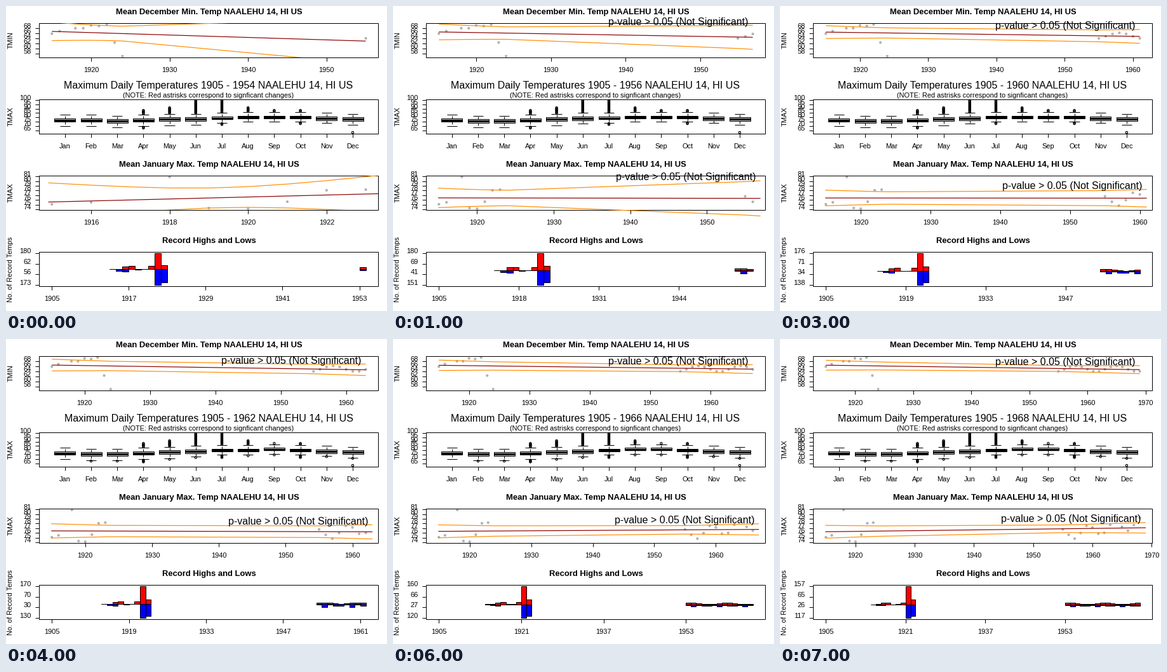
Write a matplotlib script that moves like this. It is 600 px wide and 480 px high and loops after 8 s.

```python
import math
import numpy as np
import matplotlib.pyplot as plt
from matplotlib.animation import FuncAnimation
from matplotlib.patches import Circle, Rectangle

W, H, DPI = 600, 480, 100
PX = 72 / DPI                      # points per pixel
LEFT, RIGHT, BOX_H = 52, 586, 54
X0, SPAN = 72.2, 494.4             # data range inside the 4% padding
TOPS = (27, 147, 267, 387)
STATION = "NAALEHU 14, HI US"
MONTHS = "Jan Feb Mar Apr May Jun Jul Aug Sep Oct Nov Dec".split()
STEPS = 8

plt.rcParams["font.family"] = "Liberation Sans"
fig = plt.figure(figsize=(W / DPI, H / DPI), dpi=DPI, facecolor="white")
ax = fig.add_axes([0, 0, 1, 1])


def text(x, y, s, size=11, **kw):
    kw = {"ha": "center", "va": "baseline", **kw}
    ax.text(x, y, s, fontsize=size * PX, color="black", **kw)


def line(xs, ys, color="black", width=1, **kw):
    kw = {"solid_capstyle": "butt", **kw}
    return ax.plot(xs, ys, color=color, lw=width * PX, **kw)[0]


def rect(x, y, w, h, face="none"):
    patch = Rectangle((x, y), w, h, fc=face, ec="black", lw=PX)
    return ax.add_patch(patch)


def frame(top, ylabel, x_ticks, y_ticks):
    """Panel box with (place, label) pairs for both axes."""
    base = top + BOX_H
    for x, s in x_ticks:
        line([x, x], [base, base + 6])
        text(x, base + 23, s)
    for y, s in y_ticks:
        line([LEFT - 6, LEFT], [y, y])
        text(39.5, y, s, ha="right")
    text(7.5, top + BOX_H / 2, ylabel, rotation=90, va="center")
    return rect(LEFT, top, RIGHT - LEFT, BOX_H)


def wave(year, mid, slope, swing, peak, period):
    return mid + slope * (year - 1955) + swing * np.cos(2 * np.pi * (year - peak) / period)


# Yearly means as heights on the stage; the station was closed 1925-1954
FIRST_YEARS = [1915, 1916, *range(1918, 1925)]
LATER = np.arange(1955, 1970)
DEC_MEAN = dict(zip(FIRST_YEARS, (43.5, 39.5, 35, 35, 30.5, 31.5, 29, 57.5, 79)))
DEC_MEAN.update(zip(LATER, wave(LATER, 46.8, 0, -4.5, 1958, 7)))
JAN_MEAN = dict(zip(FIRST_YEARS, (312, 309, 269, 318, 319, 308, 290, 289)))
JAN_MEAN.update(zip(LATER, wave(LATER, 308, -1.4, 9, 1957, 4.5)))


def fit_band(xs, ys, at):
    """Least squares line and the half width of its 95% confidence band."""
    slope, cut = np.polyfit(xs - 1915, ys, 1)
    free = len(xs) - 2
    spread = math.sqrt(np.sum((ys - cut - slope * (xs - 1915)) ** 2) / free)
    t = 1.96 + 2.8 / free
    gap = xs - xs.mean()
    half = t * spread * np.sqrt(1 / len(xs) + (at - xs.mean()) ** 2 / np.sum(gap ** 2))
    return cut + slope * (at - 1915), half


def trend(i, top, ylabel, title, means, y_ticks, start, last, end):
    def px(year):
        return X0 + (year - 1915) * SPAN / (last - 1915)

    seen = [(x, y) for x, y in means.items() if x <= last]
    for x, y in seen:
        ax.add_patch(Circle((px(x), y), 2.1, fc="#b3b3b3", ec="none"))
    xs, ys = np.array(seen, float).T
    years = np.array([start, *range(1916, 1925), *range(1955, end + 1)])
    mid, half = fit_band(xs, ys, years)
    curves = [line(px(years), mid, "#8b0000", 1.2),
              line(px(years), mid - half, "#ff8c00", 1.2),
              line(px(years), mid + half, "#ff8c00", 1.2)]

    step = 2 if last < 1930 else 10
    ticks = [(px(y), str(y)) for y in range(1910, 1972, step)
             if LEFT < px(y) < RIGHT + 0.5]
    box = frame(top, ylabel, ticks, y_ticks)
    text(319.5, top - 14, f"{title} {STATION}", 13, weight="bold")
    if i == 0:
        for curve in curves:
            curve.set_clip_path(box)
    else:
        text(px(end) - 7, (mid - half)[-1] - 0.5,
             "p-value > 0.05 (Not Significant)", 16, ha="right")


def month_stats(m, i):
    """Five box values and the outliers of one month."""
    season = math.cos(2 * math.pi * (m - 7.7) / 12)
    med = round(78.2 + 0.05 * i + (1.8 + 0.1 * i) * season)
    low = med - round(6 - 1.5 * season)
    high = med + 6
    outs = []
    if 3 <= m <= 9:
        peak = round(88 + 13 * math.exp(-((m - 5.5) / 1.3) ** 2))
        outs += range(high + 1, peak + 1)
    if m:
        few = 2 * (m % 3 == 0) + (i > 3)
        outs += range(low - few, low)
    if m == 11:
        outs.append(63)
    return (low, med - round(1.7 - 0.5 * season), med, med + 2, high), outs


def boxplots(i, end):
    def py(v):
        return 199 - (v - 63) * 50 / 36

    xs = [92.8 + 41.2 * m for m in range(12)]
    for m, x in enumerate(xs):
        stats, outs = month_stats(m, i)
        low, q1, med, q3, high = map(py, stats)
        rect(x - 16.5, q3, 33, q1 - q3, "white")
        line([x - 16.5, x + 16.5], [med, med], width=3.4)
        for a, b in ((q1, low), (q3, high)):
            line([x, x], [a, b], ls=(0, (4, 3)), dash_capstyle="butt")
            line([x - 8.2, x + 8.2], [b, b])
        for v in outs:
            ax.add_patch(Circle((x, py(v)), 1.6, fc="none", ec="black", lw=1.2 * PX))
    frame(TOPS[1], "TMAX", list(zip(xs, MONTHS)),
          [(py(v), str(v)) for v in range(65, 101, 5)])
    text(319, 130, f"Maximum Daily Temperatures 1905 - {end} {STATION}", 16)
    text(318.5, 144, "(NOTE: Red astrisks correspond to signficant changes)")


def extremes(i):
    """Record counts of the peak year, which shrink as later years beat them."""
    keys = (0, 1, 2, 3, 5, 7)
    hi = np.interp(i, keys, (180, 180, 179, 176, 163, 157))
    lo = np.interp(i, keys, (173, 151, 145, 138, 123, 117))
    return round(hi), round(lo)


def record_counts(i, hi, lo, end):
    left = 1 - 0.6 * i / (STEPS - 1)
    early = zip(range(1914, 1921), (1, 4, 35, 40, 1, 3, 39), (0, 18, 25, 0, 3, 0, 0))
    rows = [(y, up * left, down * left) for y, up, down in early]
    rows += [(1921, hi, lo), (1922, hi / 4, lo * 0.84)]
    rows += [(y, wave(y, 8, 0, 6, 1960.5, 7) * (0.6 + left),
              wave(y, 12, 0, 8, 1954, 2.5) * (0.6 + left)) for y in range(1953, end)]
    return rows


def records(i, end):
    hi, lo = extremes(i)
    unit = 50 / (hi + lo)
    zero = 389 + hi * unit
    width = SPAN / (end - 1905)

    def px(year):
        return X0 + (year - 1905) * width

    for year, up, down in record_counts(i, hi, lo, end):
        rect(px(year), zero - up * unit, width, up * unit, "red")
        rect(px(year), zero, width, down * unit, "blue")
    step = round((end + 1 - 1905) / 4)
    x_ticks = [(px(y), str(y)) for y in range(1905, end + 1, step)]
    y_ticks = [(389 + k * 50 / 3, str(abs(math.floor(hi - k * (hi + lo) / 3))))
               for k in range(4)]
    frame(TOPS[3], "No. of Record Temps", x_ticks, y_ticks)
    text(319.5, 373, "Record Highs and Lows", 13, weight="bold")


def draw(i):
    ax.clear()
    ax.set_xlim(0, W)
    ax.set_ylim(H, 0)
    ax.axis("off")
    end = 1954 + 2 * i
    trend(i, TOPS[0], "TMIN", "Mean December Min. Temp", DEC_MEAN,
          [(75 - 4 * (v - 58), str(v)) for v in range(58, 69, 2)],
          1915, end + 1, end + 1)
    boxplots(i, end)
    trend(i, TOPS[2], "TMAX", "Mean January Max. Temp", JAN_MEAN,
          [(320 - 7.4 * (v - 74), str(v)) for v in range(74, 82)],
          1914.91, 1923 if i == 0 else end, end + 1)
    records(i, end)
    return []


anim = FuncAnimation(fig, draw, frames=STEPS, init_func=lambda: [],
                     interval=1000, repeat=True, repeat_delay=0)
plt.show()
```
